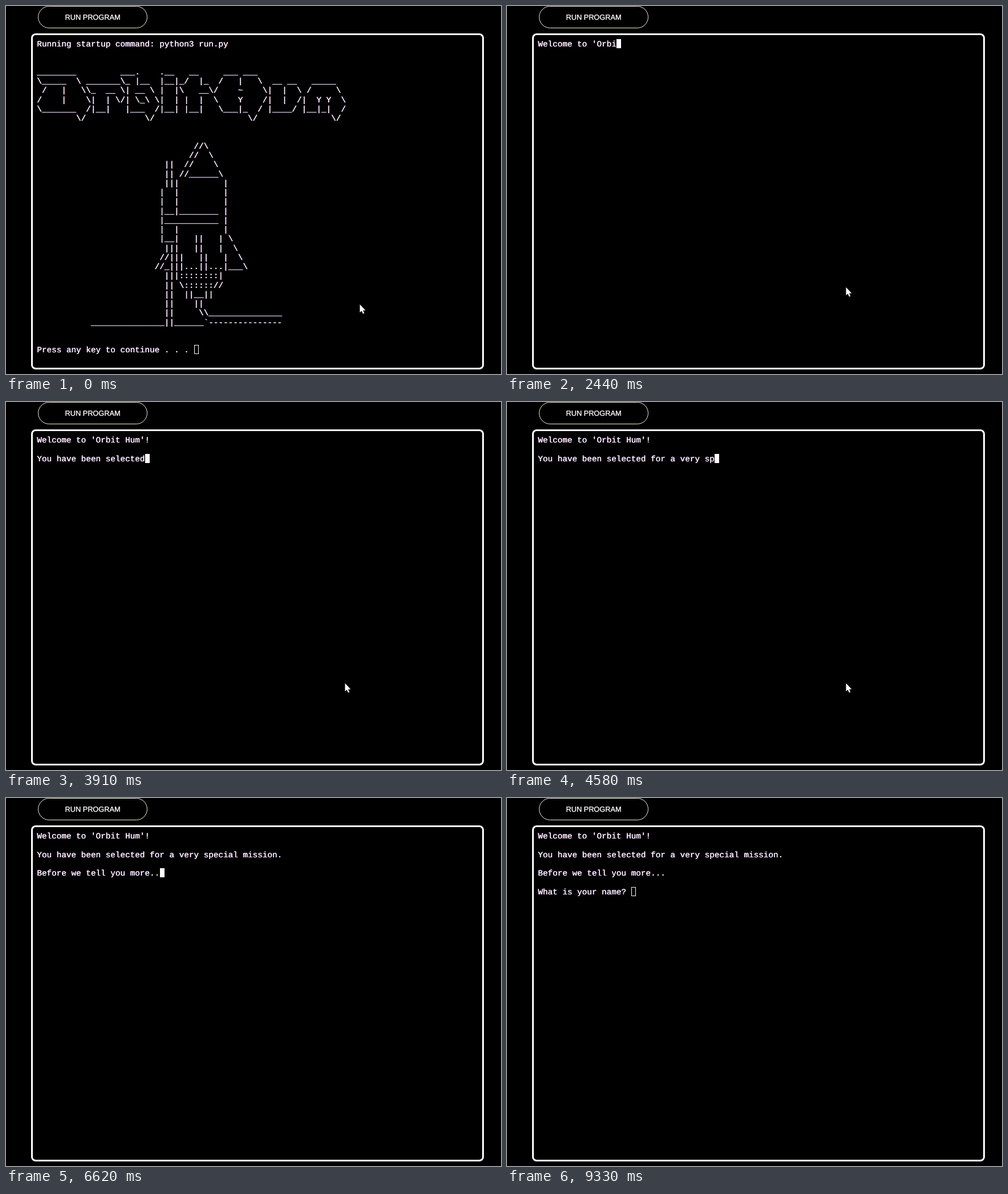
An HTML page for the animation above (9390 ms loop, 868 px wide and 645 px high).

```html
<!DOCTYPE html>
<html lang="en">
<head>
<meta charset="utf-8">
<title>Terminal</title>
<style>
  html, body { margin: 0; width: 100%; height: 100%; overflow: hidden; background: #000; }
  #stage { position: relative; width: 868px; height: 645px; overflow: hidden; background: #000; color: #fff; }
  #stage > * { position: absolute; box-sizing: border-box; }
  .button {
    left: 56px; top: 0; width: 192px; height: 39px;
    border: 1px solid #f3efd2; border-radius: 20px;
    font: 12.75px/37px "Liberation Sans", Arial, sans-serif;
    -webkit-text-stroke: 0.35px #fff;
    text-align: center; white-space: nowrap; text-rendering: geometricPrecision;
  }
  .frame { left: 44px; top: 48px; width: 794px; height: 589px; border: 3px solid #fff; border-radius: 8px; }
  pre {
    left: 54.3px; top: 60px; margin: 0;
    font: 14.34px/16.25px "Liberation Mono", "Courier New", monospace;
    text-rendering: geometricPrecision;
    /* subpixel colour fringes */
    text-shadow: -0.35px 0 #88f, 0.35px 0 #f88;
  }
  #caret { left: 0; top: 0; width: 8px; height: 16px; border: 1px solid #fff; }
  #caret.filled { background: #fff; }
  #pointer { left: 0; top: 0; overflow: visible; }
</style>
</head>
<body>
<div id="stage">
  <div class="button">RUN PROGRAM</div>
  <div class="frame"></div>
<pre id="splash">
Running startup command: python3 run.py


________         ___.    .__   __     ___ ___
\_____  \ _______\_ |__  |__|_/  |_  /   |   \  __ __   _____
 /   |   \\_  __ \| __ \ |  |\   __\/    ~    \|  |  \ /     \
/    |    \|  | \/| \_\ \|  | |  |  \    Y    /|  |  /|  Y Y  \
\_______  /|__|   |___  /|__| |__|   \___|_  / |____/ |__|_|  /
        \/            \/                   \/               \/


                                //\
                               //  \
                          ||  //    \
                          || //______\
                          |||         |
                         |  |         |
                         |  |         |
                         |__|________ |
                         |___________ |
                         |  |         |
                         |__|   ||   | \
                          |||   ||   |  \
                         //|||   ||   |  \
                        //_|||...||...|___\
                          |||::::::::|
                          || \:::::://
                          ||  ||__||
                          ||    ||
                          ||     \\_______________
           _______________||______`---------------


Press any key to continue . . . </pre>
  <pre id="story"></pre>
  <div id="caret"></div>
  <svg id="pointer" width="12" height="19">
    <path d="M0.5 0V14.2L3.7 11.2L6 16.6L8.2 15.6L6 10.4H10.4Z" fill="#fff"/>
  </svg>
</div>
<script>
const LOOP = 9390, START = 1650, TICK = 66.6;
const FOCUS = 790, BLUR = 9330;
const CELL = 8.61, ROW = 16.25;

const LINES = [
  "Welcome to 'Orbit Hum'!",
  "You have been selected for a very special mission.",
  "Before we tell you more...",
  "What is your name? "
];

// [time, characters typed]
const TYPING = [
  [1650, 2], [3240, 33], [3580, 40], [4580, 59], [5540, 77], [5740, 81],
  [6490, 96], [6620, 98], [6690, 100], [7450, 113], [7690, 118]
];

// [time, x, y]; it finally leaves through the bottom edge
const POINTER = [
  [0, 620, 523], [70, 605, 504], [120, 595, 493], [520, 594, 493],
  [790, 594, 480], [860, 594, 493],
  [5050, 606, 503], [5120, 648, 540], [5180, 704, 588], [5250, 756, 634], [5320, 780, 660]
];

const [splash, story, caret, pointer] =
  ["splash", "story", "caret", "pointer"].map(id => document.getElementById(id));

const lastBefore = (table, t) => table.findLastIndex(row => row[0] <= t);

function typedCount(t) {
  const i = lastBefore(TYPING, t);
  const [t0, n0] = TYPING[i];
  if (i === TYPING.length - 1) return n0;
  const [t1, n1] = TYPING[i + 1];
  const ticks = Math.round((t1 - t0) / TICK);
  const tick = Math.floor((t - t0) / (t1 - t0) * ticks);
  return Math.round(n0 + (n1 - n0) * tick / ticks);
}

function typedLines(count) {
  const out = [];
  for (const line of LINES) {
    out.push(line.slice(0, count));
    count -= line.length;
    if (count <= 0) break;
  }
  return out;
}

function move(el, x, y) {
  el.style.transform = `translate(${Math.round(x)}px, ${Math.round(y)}px)`;
}

function placeCaret(col, row) {
  move(caret, 54.3 + col * CELL, 58 + row * ROW);
}

function render(t) {
  const typing = t >= START;
  splash.style.display = typing ? "none" : "block";
  story.style.display = typing ? "block" : "none";
  if (typing) {
    const lines = typedLines(typedCount(t));
    story.textContent = lines.join("\n\n");
    placeCaret(lines.at(-1).length, 2 * (lines.length - 1));
  } else {
    placeCaret(32, 33);
  }
  caret.classList.toggle("filled", t >= FOCUS && t < BLUR);
  const [, x, y] = POINTER[lastBefore(POINTER, t)];
  move(pointer, x, y);
}

const begin = performance.now();
function loop() {
  render((performance.now() - begin) % LOOP);
  requestAnimationFrame(loop);
}
loop();
</script>
</body>
</html>
```
